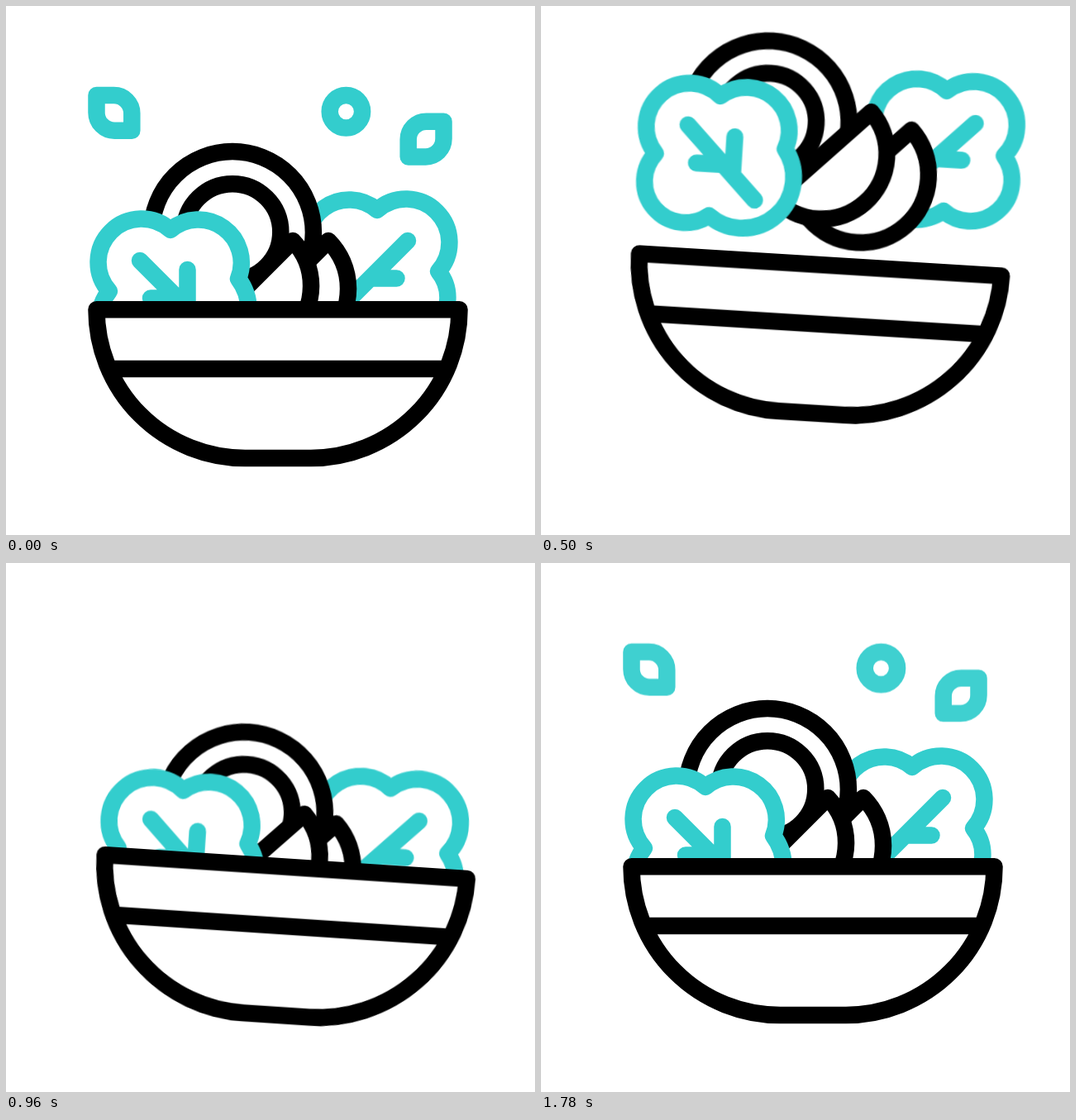
Animation, 640 px wide and 640 px high, one loop 1820 ms. Source, as an HTML page:

```html
<!DOCTYPE html>
<html lang="en">
<head>
<meta charset="utf-8">
<title>Salad bowl</title>
<style>
  html, body { margin: 0; width: 100%; height: 100%; overflow: hidden; background: #fff; }
  svg { display: block; width: 100%; height: 100%; }

  .line { fill: none; stroke: #000; stroke-width: 20.5; stroke-linecap: round; stroke-linejoin: round; }
  .teal { stroke: #33cdcd; }
  .solid { fill: #fff; }

  .bits, .bowl, .part {
    animation-duration: 1820ms;
    animation-iteration-count: infinite;
    animation-timing-function: cubic-bezier(.333, 0, .667, 1);
  }
  .bits { animation-name: drift, fade; animation-timing-function: cubic-bezier(.333, 0, .667, 1), linear; }
  .bowl { animation-name: toss; transform-origin: 329px 515px; }
  .leaf-left { animation-name: leaf-left-y, leaf-left-x; }
  .leaf-right { animation-name: leaf-right-y, leaf-right-x; }
  .onion { animation-name: onion-y, onion-x; }
  .slice-back { animation-name: slice-back-y, slice-back-x; }
  .slice-front { animation-name: slice-front-y, slice-front-x; }

  /* Small bits sink away, then drop in again from above */
  @keyframes drift {
    0%, 98.901%, 100% { translate: 0 0; }
    21.978% { translate: 0 48px; }
    81.319% { translate: 0 -48px; }
  }
  @keyframes fade {
    0%, 7.692%, 98.901%, 100% { opacity: 1; }
    17.582%, 81.319% { opacity: 0; }
  }

  /* Bowl is thrown up and rocks until it rests */
  @keyframes toss {
    0%, 65.934%, 100% { translate: 0 0; rotate: 0deg; }
    21.978% { translate: 0 -74px; rotate: 8deg; }
    38.462% { translate: 0 0; rotate: -9deg; }
    49.451% { translate: 0 0; rotate: 6deg; }
    60.44% { translate: 0 0; rotate: -4deg; }
  }

  /* Contents hop with staggered starts and sink past rest */
  @keyframes leaf-left-y {
    0%, 5.495%, 60.44%, 100% { translate: 0 0; }
    27.473% { translate: 0 -100px; }
    43.956% { translate: 0 28px; }
  }
  @keyframes leaf-left-x {
    0%, 5.495%, 34.066%, 100% { transform: translateX(0); }
    25.275% { transform: translateX(-4px); }
  }
  @keyframes leaf-right-y {
    0%, 5.495%, 62.088%, 100% { translate: 0 0; }
    27.473% { translate: 0 -99px; }
    44.505% { translate: 0 32px; }
  }
  @keyframes leaf-right-x {
    0%, 13.187%, 39.56%, 100% { transform: translateX(0); }
    25.275% { transform: translateX(21px); }
  }
  @keyframes onion-y {
    0%, 6.593%, 62.637%, 100% { translate: 0 0; }
    28.571% { translate: 0 -76px; }
    46.154% { translate: 0 49px; }
  }
  @keyframes onion-x {
    0%, 6.593%, 45.055%, 100% { transform: translateX(0); }
    28.571% { transform: translateX(-19px); }
  }
  @keyframes slice-front-y {
    0%, 7.692%, 62.637%, 100% { translate: 0 0; }
    29.67% { translate: 0 -108px; }
    46.154% { translate: 0 28px; }
  }
  @keyframes slice-front-x {
    0%, 7.692%, 39.56%, 100% { transform: translateX(0); }
    29.67% { transform: translateX(33px); }
  }
  @keyframes slice-back-y {
    0%, 9.341%, 63.736%, 100% { translate: 0 0; }
    30.769% { translate: 0 -92px; }
    47.253% { translate: 0 37px; }
  }
  @keyframes slice-back-x {
    0%, 8.791%, 63.736%, 100% { transform: translateX(0); }
    27.473% { transform: translateX(39px); }
    48.352% { transform: translateX(-5px); }
  }
</style>
</head>
<body>
<svg viewBox="0 0 640 640">
  <defs>
    <path id="leaf" d="M199 271 A52 52 0 0 1 281 330 A61.7 61.7 0 0 1 194 416 A49.8 49.8 0 0 1 125 345 A52.4 52.4 0 0 1 199 271 Z"/>
    <path id="bit" d="M109.5 108 H130.5 A21.8 21.8 0 0 1 152.3 129.8 V150.7 H131.3 A21.8 21.8 0 0 1 109.5 128.9 Z"/>
    <clipPath id="above-rim"><rect x="-200" y="-400" width="1040" height="767"/></clipPath>
  </defs>

  <g class="bits line teal">
    <use href="#bit"/>
    <use href="#bit" transform="matrix(-1 0 0 1 639 31.7)"/>
    <circle cx="411.4" cy="127.7" r="19.7"/>
  </g>

  <g class="bowl line">
    <g clip-path="url(#above-rim)">
      <g class="part leaf-right teal">
        <use class="solid" href="#leaf" transform="matrix(-1 0 0 1 648 -24)"/>
        <path d="M486 284 L400 370 M472.5 329.5 H441"/>
      </g>
      <g class="part onion">
        <circle class="solid" cx="274" cy="274" r="97.9"/>
        <circle cx="274" cy="273.5" r="58.3"/>
      </g>
      <path class="part slice-back solid" d="M390 284 A82 82 0 0 1 274 400 Z"/>
      <path class="part slice-front solid" d="M347 284 A78.5 78.5 0 0 1 236 395 Z"/>
      <g class="part leaf-left teal">
        <use class="solid" href="#leaf"/>
        <path d="M162 308 L248 394 M219.5 319 V365.5 M175 353.5 H207.5"/>
      </g>
    </g>
    <path class="solid" d="M109.5 367.3 H548.5 A179.7 179.7 0 0 1 368.8 547 H289.2 A179.7 179.7 0 0 1 109.5 367.3 Z"/>
    <path d="M126 439 H532"/>
  </g>
</svg>
</body>
</html>
```
